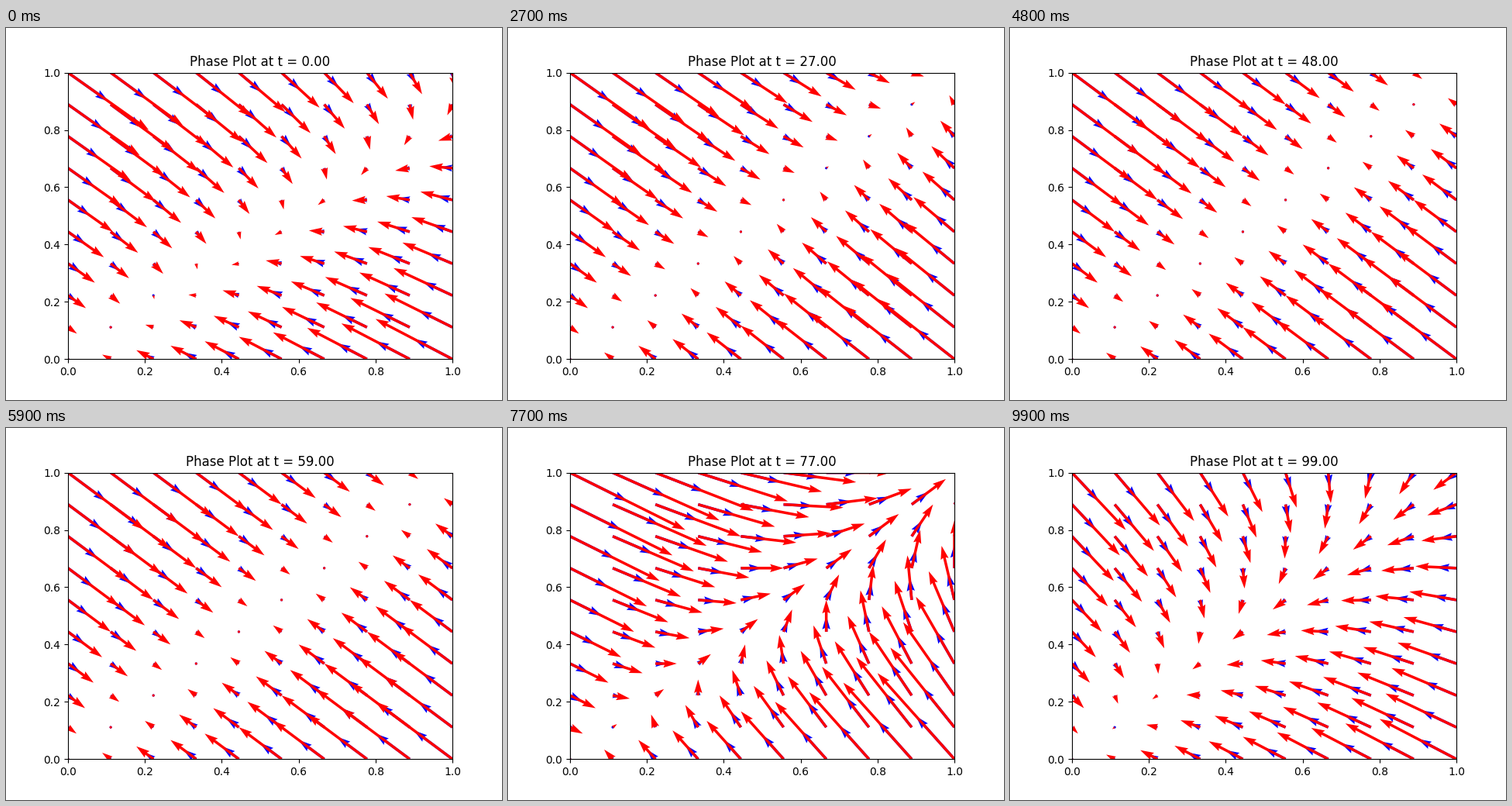
A matplotlib script that plays this animation: 640 by 480 pixels, repeating every 10000 ms.

```python
import numpy as np
import matplotlib.pyplot as plt
from matplotlib.animation import FuncAnimation

FRAMES = 100
BOOST, DAMP = 1.5, 0.7

axis = np.linspace(0, 1, 10)
X, Y = np.meshgrid(axis, axis)


def couplings(t):
    """Strength of each variable's pull on the other, switched on and off."""
    wave = np.sin(0.1 * t)
    base = DAMP if np.sin(0.08 * t) >= 0 else 1.0
    a = base * (BOOST if wave >= 0 else 1.0)
    b = base * (BOOST if wave > 0 else 1.0)
    return a, b


def field(t):
    a, b = couplings(t)
    return a * Y - X, b * X - Y


fig, ax = plt.subplots(figsize=(6.4, 4.8), dpi=100)
ax.set_xlim(0, 1)
ax.set_ylim(0, 1)
title = ax.set_title("")


def arrows(color, scale):
    return ax.quiver(X, Y, *field(0), color=color, angles="xy",
                     scale_units="xy", scale=scale, width=0.007)


layers = [arrows("blue", 10), arrows("red", 5)]


def update(t):
    for layer in layers:
        layer.set_UVC(*field(t))
    title.set_text(f"Phase Plot at t = {t:.2f}")
    return [*layers, title]


anim = FuncAnimation(fig, update, frames=FRAMES, interval=100,
                     repeat=True, repeat_delay=0, blit=False)
plt.show()
```
